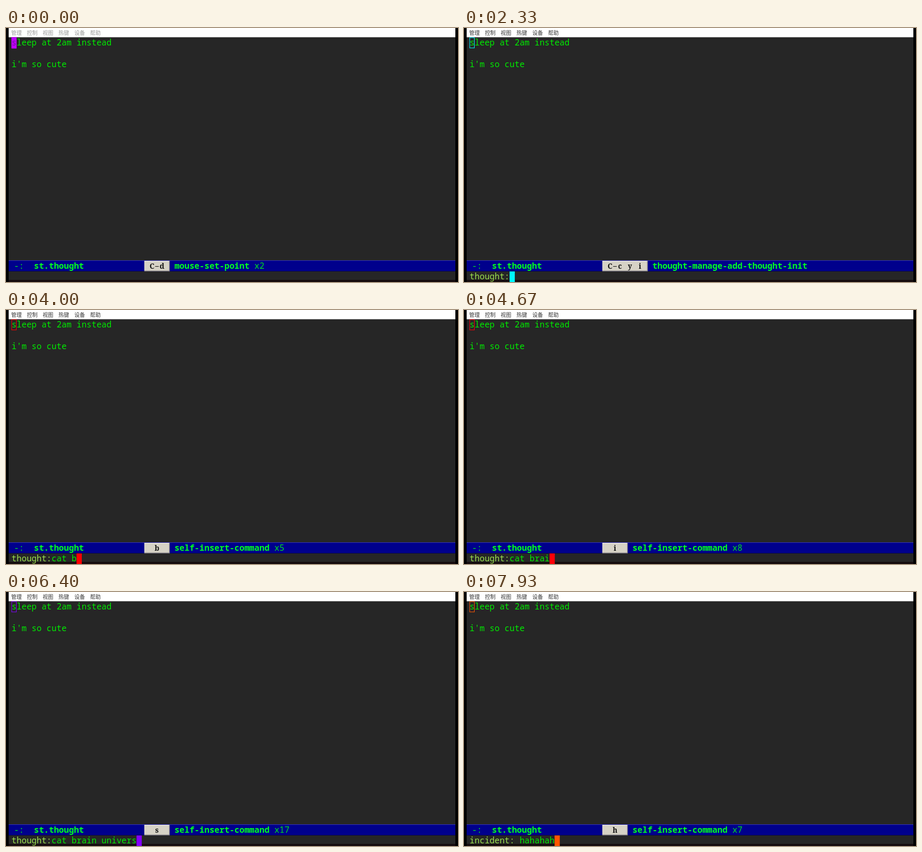
Recreate the animation shown at these times as an HTML page with a canvas. Size 853 px wide and 480 px high, loop 8 s.

```html
<!DOCTYPE html>
<html lang="en">
<head>
<meta charset="utf-8">
<title>Thought buffer</title>
<style>
  html, body { margin: 0; width: 100%; height: 100%; overflow: hidden; background: #000; }
  canvas { display: block; }
</style>
</head>
<body>
<canvas id="stage" width="853" height="480"></canvas>
<script>
const ctx = document.getElementById('stage').getContext('2d');
const LOOP = 8000;
const CELL = 9.432;
const MONO = '15.72px "Noto Sans Mono", "DejaVu Sans Mono", monospace';
const MENU_FONT = '10px "Noto Sans CJK SC", "Noto Sans CJK", sans-serif';
const KEY_FONT = 'bold 13.5px "Noto Serif", "Liberation Serif", serif';
const LEFT = 10.6;

// Cursor hue over time: [ms, turns of the colour wheel]
const HUES = [[0, .79], [2330, 4.5], [3330, 6], [4670, 8], [5730, 9.73], [7000, 11.667], [7930, 13.05], [8000, 13.15]];

const CLICK = 400, PROMPT = 2070, RETURN = 6800;
const TYPED = [
  { text: 'cat brain universe', start: 3230, step: 190 },
  { text: 'hahahah', start: 7080, step: 112 },
];

function rect(color, x, y, w, h) {
  ctx.fillStyle = color;
  ctx.fillRect(x, y, w, h);
}

function write(text, x, y, color, font = MONO) {
  ctx.font = font;
  ctx.fillStyle = color;
  ctx.fillText(text, x, y);
}

function cursorColor(t) {
  const i = Math.max(1, HUES.findIndex(([ms]) => ms >= t));
  const [t0, h0] = HUES[i - 1], [t1, h1] = HUES[i];
  const turns = h0 + (h1 - h0) * (t - t0) / (t1 - t0);
  return `hsl(${turns % 1 * 360}, 100%, 50%)`;
}

function typedCount({ text, start, step }, t) {
  return Math.max(0, Math.min(text.length, Math.floor((t - start) / step) + 1));
}

function stateAt(t) {
  if (t < PROMPT) return { key: 'C-d', command: 'mouse-set-point', count: t < CLICK ? 2 : 3 };
  const second = t >= RETURN;
  const entry = TYPED[+second];
  const count = typedCount(entry, t);
  const last = entry.text[count - 1];
  const base = { prompt: second ? 'incident: ' : 'thought:', input: entry.text.slice(0, count), count };
  if (count) return { ...base, key: last === ' ' ? 'SPC' : last, command: 'self-insert-command' };
  return second
    ? { ...base, key: 'RET', command: 'exit-minibuffer' }
    : { ...base, key: 'C-c y i', command: 'thought-manage-add-thought-init' };
}

function drawMenu(t) {
  rect('#fff', 5, 0, 843, 17.5);
  ['管理', '控制', '视图', '热键', '设备', '帮助'].forEach((label, i) =>
    write(label, 9.7 + i * 29.8, 13.2, t < CLICK ? '#999' : '#333', MENU_FONT));
}

function drawModeLine({ key, command, count }) {
  rect('#00008c', 5, 439, 843, 21);
  rect('#3434b4', 5, 439, 843, 1);
  rect('#000058', 5, 459, 843, 1);
  write('-:', 15, 455, '#00e020');
  write('st.thought', 52.7, 455, '#00ff20', 'bold ' + MONO);

  const cells = Math.max(3, key.length) + 2;
  const width = cells * CELL + .6;
  rect('#d6d2c6', 261, 440, width, 19.5);
  rect('#f0eee6', 261, 440, width, 1);
  rect('#85827a', 261, 458.5, width, 1);
  rect('#85827a', 260 + width, 440, 1, 19.5);
  ctx.textAlign = 'center';
  [...key].forEach((char, i) => {
    const x = 261.3 + ((cells - key.length) / 2 + i + .5) * CELL;
    write(char === '-' ? '–' : char, x, 455, '#111', KEY_FONT);
  });
  ctx.textAlign = 'left';

  const x = 261.3 + (cells + 1) * CELL;
  write(command, x, 455, '#00ff20', 'bold ' + MONO);
  if (count > 1) write('x' + count, x + (command.length + 1) * CELL, 455, '#00e020');
}

function draw(time) {
  const t = Math.floor((time % LOOP + 5) * .015) / .015;
  const state = stateAt(t);
  const color = cursorColor(Math.min(t, LOOP));

  rect('#000', 0, 0, 853, 480);
  rect('#262626', 5, 17.5, 843, 458.5);
  rect('#160c0e', 5, 476, 843, 4);
  drawMenu(t);

  if (!state.prompt) rect(color, 10.5, 17.5, 9.5, 21);
  write('sleep at 2am instead', LEFT, 33, '#00ea00');
  if (!state.prompt) {
    rect(color, 10.5, 17.5, 9.5, 21);
    write('s', LEFT, 33, 'rgba(38, 38, 38, .45)');
  } else {
    ctx.strokeStyle = color;
    ctx.lineWidth = 1;
    ctx.strokeRect(10.8, 18.3, 8.7, 19.4);
  }
  write("i'm so cute", LEFT, 74, '#00ea00');

  drawModeLine(state);

  if (state.prompt) {
    const { prompt, input } = state;
    write(prompt, LEFT, 475, '#9be050');
    write(input, LEFT + prompt.length * CELL, 475, '#00ea00');
    rect(color, LEFT + (prompt.length + input.length) * CELL, 460, 9.8, 20);
  }
}

function tick() {
  draw(performance.now());
  requestAnimationFrame(tick);
}
tick();
</script>
</body>
</html>
```
